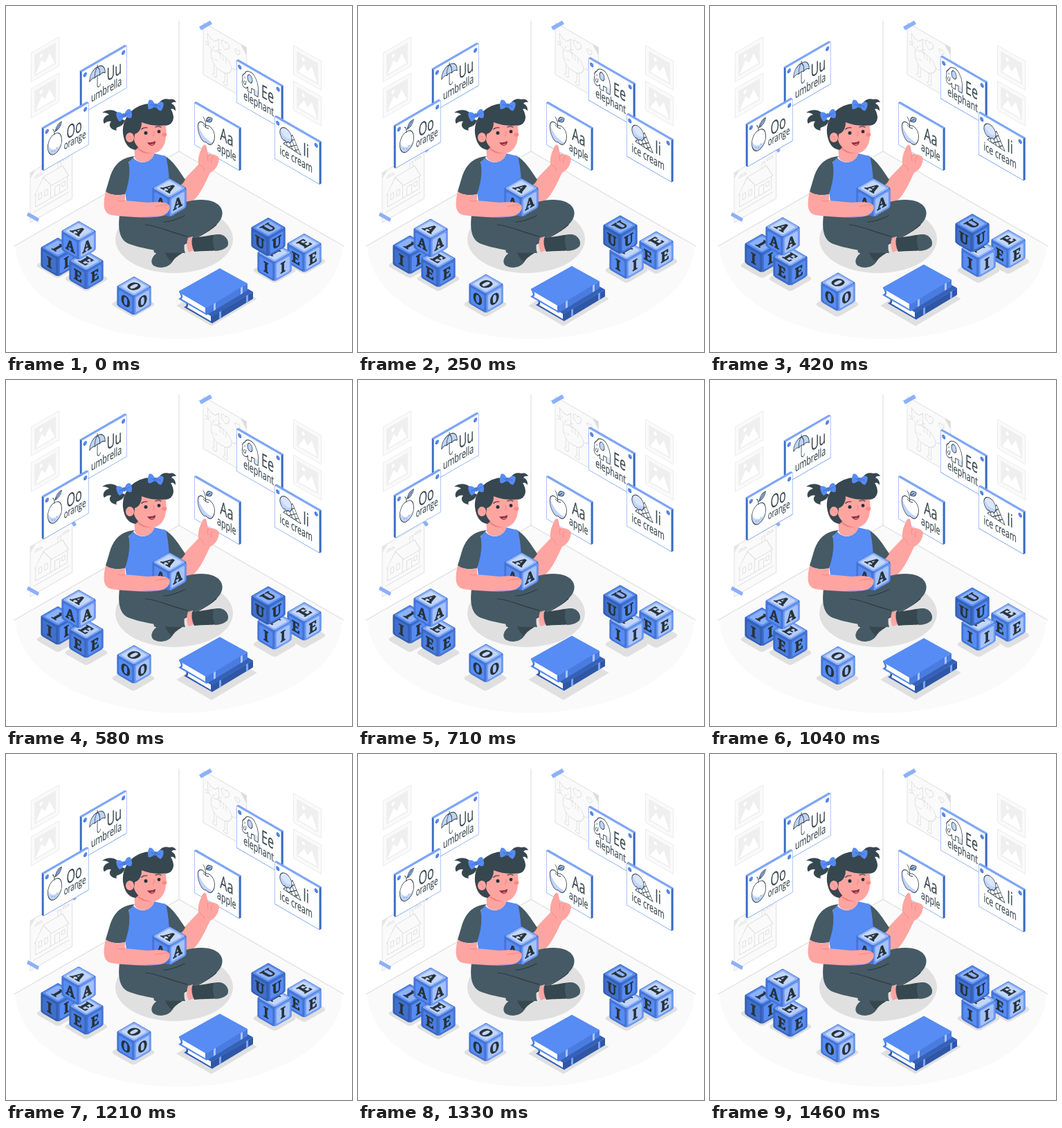
An HTML page that plays this animation: 500 px wide and 500 px high, repeating every 1500 ms.

```html
<!DOCTYPE html>
<html lang="en">
<head>
<meta charset="utf-8">
<title>Learning vowels</title>
<style>
html, body { margin: 0; height: 100%; overflow: hidden; background: #fff; }
svg { display: block; width: 100vw; height: 100vh; }
text { text-anchor: middle; }
.word { font-family: "Open Sans", sans-serif; fill: #37474f; stroke: #37474f; stroke-width: .2; }
.letter { font: 700 20px "Noto Serif", serif; fill: #263238; stroke: #263238; stroke-width: .9; }
.ink { fill: none; stroke: #37474f; stroke-width: 1; stroke-linecap: round; stroke-linejoin: round; }
.sketch { fill: none; stroke: #dedede; stroke-width: 1; stroke-linejoin: round; }
</style>
</head>
<body>
<svg id="stage" viewBox="0 0 500 500"></svg>
<script>
const BLUE = '#568cf4', PALE = '#c0d4fb', DARK = '#37474f', SLATE = '#455a64',
  SKIN = '#ffa5a1', BLUSH = '#f4827f', SHADOW = '#e0e0e0';

const path = (d, fill, extra = '') => `<path d="${d}" fill="${fill}" ${extra}/>`;
const line = (d, color, width = 1) =>
  path(d, 'none', `stroke="${color}" stroke-width="${width}" stroke-linecap="round" stroke-linejoin="round"`);
const ink = d => `<path class="ink" d="${d}"/>`;
const sketch = d => `<path class="sketch" d="${d}"/>`;
const floating = content => `<g class="float">${content}</g>`;

// Isometric planes: left wall, right wall and floor
const plane = (matrix, x, y, content) => `<g transform="matrix(${matrix},${x},${y})">${content}</g>`;
const onLeft = (...args) => plane('.866,-.5,0,1', ...args);
const onRight = (...args) => plane('.866,.5,0,1', ...args);
const onFloor = (...args) => plane('.866,.5,-.866,.5', ...args);
const rect = (x, y, w, h, fill, rx = 0) =>
  `<rect x="${x}" y="${y}" width="${w}" height="${h}" rx="${rx}" fill="${fill}"/>`;

const picture = rect(0, 0, 47.5, 43, '#ededed') + rect(1.2, 1.2, 45, 40.6, '#fafafa') +
  rect(6, 6, 35.5, 31, '#efefef') + path('M8 35L18 20L24 27L31 16L40 35Z', '#fff') +
  '<circle cx="17" cy="13" r="2.6" fill="#fff"/>';

const house = rect(0, 0, 70, 72, '#fafafa') + sketch('M0 0H70V72H0Z') +
  sketch(`M9 54V34L22 18L34 34V54ZM7 37L22 17H54L64 36H34M62 36V54H34M14 38h5v8h-5zM24 38h5v8h-5z
    M41 54V41h8v13M53 41h5v6h-5zM46 17V9h5v8M5 60H65M8 12q2-5 6-2q4-3 6 2zM54 10q2-5 6-2q4-2 5 2z`) +
  path('M0 0H9L0 9Z', '#e4e4e4');

const cat = rect(0, 0, 72, 75, '#fafafa') + sketch('M0 0H72V75H0Z') +
  sketch(`M8 23L7 12L13 17H20L26 11L26 24C26 34 8 34 8 23ZM12 22v2M21 22v2M15 26l2 1l2-1M17 27v2
    M3 25l6 1M3 30l6-2M25 26l6-2M25 28l6 2
    M14 32C10 45 18 56 30 55C44 56 52 44 44 36Q36 28 24 31
    M18 52V64q-5 4 1 5q5-1 3-5V55M36 55V67q-5 4 1 5q5-1 3-5V53
    M47 42Q58 44 55 32Q54 25 59 25M28 31l1 7M33 31l1 7M38 33l0 7M15 43q5 2 9 0
    M37 21C24 13 33 5 37 11C41 5 49 13 37 21ZM57 18C50 13 54 8 57 12C60 8 65 13 57 18Z`) +
  path('M72 0H62L72 11Z', '#dcdcdc');

function card(side, x, y, title, titleX, word, wordX, icon, { size = 17, wordY, pins = true } = {}) {
  const left = side === onLeft, w = 75, h = 61;
  const depth = left ? -3.2 : 3.2, edgeX = left ? 0 : w;
  const label = (t, cx, cy, px) =>
    `<text class="word" font-size="${px}" transform="translate(${cx} ${cy}) scale(.72 1)">${t}</text>`;
  const pin = cx => `<circle cx="${cx}" cy="7" r="3" fill="#4476d8"/><circle cx="${cx + .5}" cy="6.6" r="2.1" fill="${BLUE}"/>`;
  return side(x, y,
    path(`M${edgeX} 0l${depth} -3v${h}l${-depth} 3Z`, '#3c6ac6') +
    path(`M0 0l${depth} -3h${w}l${-depth} 3Z`, '#7ba4f7') +
    rect(0, 0, w, h, BLUE) + rect(.6, .6, w - 1.2, h - 1.2, '#fff') +
    (pins ? pin(5.5) + pin(69.5) : '') + icon +
    label(title, titleX, left ? 35 : 32, 26) + label(word, wordX, wordY || (left ? 52 : 50), size));
}

const canopy = 'M13 21C13 11 19 6 26 6S39 11 39 21Q34 17 30 20Q26 17 22 20Q18 17 13 21Z';
const umbrella = path(canopy, PALE) + ink(canopy + 'M26 6V3M22 20Q21 11 26 6Q31 11 30 20M26 19V33q0 3 3 3q2 0 2-3');
const orangeBody = 'M18 17C10 17 6 25 7 33S13 46 18 46S30 42 30 32S25 17 18 17Z';
const orange = path(orangeBody, '#fff') + path('M8 29C7 38 12 46 18 46C23 46 27 42 29 37C21 42 12 39 8 29Z', PALE) +
  path('M19 14Q21 4 30 5Q28 14 19 14Z', '#9fbdf9') +
  ink(orangeBody + 'M18 18Q18 11 15 9M19 14Q21 4 30 5Q28 14 19 14ZM19 14L27 7M14 40h.1M18 42h.1M22 39h.1');
const appleBody = 'M19 24C13 19 6 23 6 32C6 42 13 50 18 48Q20 47 22 48C28 50 34 41 34 32C34 23 26 19 19 24Z';
const apple = path(appleBody, '#fff') + path('M7 28C4 40 13 50 18 48Q20 47 22 48C25 49 28 46 30 43C20 44 10 39 7 28Z', PALE) +
  path('M20 17Q21 8 30 8Q30 16 20 17Z', '#9fbdf9') +
  ink(appleBody + 'M19 26Q20 17 15 13M20 17Q21 8 30 8Q30 16 20 17ZM20 17L27 11M15 25q5 3 9 0');
const elephantBody = `M14 12C17 4 28 3 32 10C37 16 37 27 36 35H30V28H25V35H19V29
  C17 33 12 34 10 30C8 25 12 21 10 18Q11 14 14 12Z`;
const elephant = path(elephantBody, '#fff') + path('M21 10C28 9 28 21 23 21C18 21 17 13 21 10Z', PALE) +
  path('M25 28H30V35H36V27Q30 25 25 28Z', '#dbe6fd') +
  ink(elephantBody + 'M21 10C28 9 28 21 23 21C18 21 17 13 21 10ZM14 17v1.5M13 23Q11 28 14 28Q16 27 16 22');
const cone = 'M30 12L44 34L15 32Z';
const iceCream = path(cone, '#fff') + ink(cone + 'M26 15L37 33M22 20L30 33M18 26L22 33M33 17L17 29M37 23L24 32M40 28L33 33') +
  '<circle cx="19" cy="18" r="10" fill="#dbe6fd"/>' + path('M10 14C8 24 15 29 22 28C27 26 29 22 29 18Q18 26 10 14Z', PALE) +
  ink('M29 18A10 10 0 1 0 15 27Q18 25 20 28Q23 24 25 26Q29 23 29 18Z');

const LIGHT = ['#8fb3f8', '#c3d6fb', '#4574d4', BLUE, '#6a98f5', '#a6c2fa'];
const MEDIUM = ['#7ba5f7', '#b5ccfa', '#3b69c4', '#4a7ce0', '#4574d4', BLUE];
const DEEP = [BLUE, '#8db1f8', '#345fb4', '#4070cc', '#3f6ec9', BLUE];

function cube(x, y, letter, [topEdge, top, leftEdge, left, rightEdge, right], turned = false) {
  const s = 28.4;
  const face = (edge, panel) => rect(.5, .5, s - 1, s - 1, edge, 3) + rect(3.2, 3.2, s - 6.4, s - 6.4, panel, 2.5) +
    `<text class="letter" x="${s / 2}" y="${s / 2 + 7.2}">${letter}</text>`;
  const lid = face(topEdge, top);
  return `<g transform="translate(${x} ${y})">` +
    path('M0 2L22.6 15V40L0 53L-22.6 40V15Z', leftEdge, `stroke="${leftEdge}" stroke-width="4" stroke-linejoin="round"`) +
    (turned ? plane('.866,-.5,.866,.5', -24.6, 14.2, lid) : onFloor(0, 0, lid)) +
    onRight(-24.6, 14.2, face(leftEdge, left)) + onLeft(0, 28.4, face(rightEdge, right)) + '</g>';
}

const cubeShadow = (x, y) => onFloor(x, y - 19, rect(0, 0, 38, 38, SHADOW, 5));

function book(x, y, cover, spine, band) {
  const strip = u => path(`M${40 + u} ${24.5 - u * .6}l3-1.8v10l-3 1.8z`, band);
  return `<g transform="translate(${x} ${y})">` +
    path('M0 0L40 24L99 -11V-1L40 34.5L0 11.5L3 8Z', spine) +
    path('M3 3L38 24V31.5L4 11.5Q7 7 3 3Z', '#fff') +
    path('M0 0L59 -33L99 -11L40 24.5L0 2Z', cover) +
    line('M0 11L40 34', cover, 1.3) + strip(10) + strip(49) + '</g>';
}

const bow = (x, y, turn) => `<g transform="translate(${x} ${y}) rotate(${turn})">` +
  path('M0 0C-5 -8 -10 -8 -11 -5Q-12 2 -9 7Q-4 7 0 0C4 -8 9 -9 11 -5Q12 2 9 6Q4 6 0 0Z', BLUE) +
  line('M-1 0L-7 0M1 0L7 -1', '#4172d4') + '<circle r="3" fill="#4a7ce0"/></g>';

const legs =
  path('M230 298C255 279 285 277 300 283C316 290 315 304 307 313C298 324 272 334 258 344L236 366L214 356L205 310Z', SLATE) +
  path('M224 353C212 359 207 369 213 375C223 381 236 377 240 370C244 363 251 360 256 356Z', SLATE) +
  path('M236 357L256 356C249 360 244 363 240 370Q234 366 230 356Z', DARK) +
  path('M164 302C162 320 163 336 176 343C196 351 230 356 259 357C256 348 258 340 262 332C250 328 236 321 226 312L240 300Z', SLATE) +
  line('M202 316C220 318 240 328 262 333M258 344C275 334 292 328 304 316M258 303Q240 312 228 312', '#2b3a42', 1.2) +
  path('M263 335L270 333Q267 344 272 353L264 356Q259 346 263 335Z', SKIN) +
  path('M269 335C285 334 298 330 308 330C318 331 323 340 320 347C312 356 287 353 272 355Q267 345 269 335Z', DARK) +
  path('M300 331.5Q305 330 308 330C318 331 323 340 320 347Q314 354 302 354Q297 342 300 331.5Z', SLATE);

const torso =
  path('M228 216C241 222 250 238 259 251C255 259 248 263 240 264L228 250Z', SLATE) +
  path('M184 219C191 229 209 229 214 213L231 217C235 233 236 250 236 262L240 300C214 308 190 307 173 303C178 285 169 270 172 246C174 231 178 222 184 219Z', BLUE) +
  path('M186 217C164 219 155 232 150 248L144 268C150 274 166 274 172 272C178 255 180 238 177 226Z', SLATE) +
  path('M185 196L186 219C191 229 209 228 214 215L212 205Z', SKIN) +
  path('M189 206Q198 215 212 213V208Z', BLUSH);

const head =
  path('M168 164C162 148 148 148 139 154Q146 154 149 157C141 159 139 166 142 170Q147 165 152 167C147 172 151 179 160 180C157 172 168 178 172 165Z', DARK) +
  path('M218 150C219 137 228 132 236 135Q243 133 246 139Q241 138 239 141Q246 144 245 152Q242 147 238 149Q243 155 239 162Q233 154 222 158Z', DARK) +
  path('M169 184C167 160 186 141 210 141C230 141 243 150 242 162Q241 172 230 173L187 208C176 206 171 198 169 184Z', DARK) +
  path('M187 178C190 164 200 164 229 168C232 176 232 182 231 190C230 203 222 213 211 213C198 212 188 204 185 194Z', SKIN) +
  path('M182 186Q196 184 196 168Q214 175 232 172Q238 164 230 158L190 158Z', DARK) +
  `<ellipse cx="179" cy="190" rx="6" ry="7" fill="${SKIN}"/>` + line('M176 188Q180 187 181 193', BLUSH, .9) +
  `<ellipse cx="229" cy="186" rx="3.4" ry="2.8" fill="#ff8785"/>` +
  '<circle cx="202" cy="183.5" r="2.5" fill="#263238"/><circle cx="221" cy="181.5" r="2.4" fill="#263238"/>' +
  line('M196 178Q199 175 204 176M216 175Q220 173 224 175', '#263238', 1.2) +
  line('M213 181Q216 186 212 188', BLUSH, 1) +
  path('M204 197Q211 198 216 195Q216 201 211 202Q207 202 204 197Z', '#8a3440') + path('M208 200.5Q211 198.5 214 199Q213 202 208 200.5Z', '#ff6f73') +
  bow(171, 158, -14) + bow(216, 144, 12);

const rightArm =
  path(`M258 250L278 229C277 219 280 211 284 203C286 199 290 200 290 205L292 214C299 213 309 217 308 222
    C306 233 301 238 295 241C288 255 281 272 271 281C262 287 254 282 250 274L241 263Q252 261 258 250Z`, SKIN) +
  line('M292 214Q290 219 292 224M299 217Q295 221 297 227M280 229Q285 232 287 238', BLUSH, .8);
const leftArm =
  path(`M144 268C140 286 140 299 152 302C178 306 205 305 222 304C232 302 239 295 236 288
    C228 281 216 284 204 284L172 281V272C164 274 152 274 144 268Z`, SKIN) +
  line('M236 288Q225 287 216 290M172 281Q166 283 162 281', BLUSH, .9);

const scene = [
  path('M250 210L14 346A236 135 0 0 0 486 346Z', '#fafafa'),
  line('M250 22V210L12 347M250 210L488 347', SHADOW, 1.3),
  onLeft(36, 67.5, picture), onLeft(36, 119.5, picture),
  onRight(415, 56, picture), onRight(415, 107.5, picture),
  onLeft(35, 241, house), onRight(285, 24, cat),
  path('M32 298L48 307L46 312L30 303Z', '#8db0f7'), path('M93 205L99 204L102 209L98 212Z', '#8db0f7'),
  path('M279 30L295 21L298 26L282 35Z', '#8db0f7'),
  floating(
    card(onLeft, 109.5, 95, 'Uu', 54, 'umbrella', 41, umbrella) +
    card(onLeft, 54.5, 177, 'Oo', 51, 'orange', 52, orange, { size: 15.5, wordY: 48 }) +
    card(onRight, 333, 78.5, 'Ee', 52, 'elephant', 37, elephant) +
    card(onRight, 388, 159.5, 'Ii', 52.5, 'ice cream', 36, iceCream)),
  '<ellipse cx="243" cy="337" rx="85" ry="49" fill="' + SHADOW + '"/>',
  cubeShadow(75, 375), cubeShadow(116, 394), cubeShadow(184, 431), cubeShadow(388, 382), cubeShadow(431, 369),
  path('M247 433L310 396L362 423L297 462Z', SHADOW, `stroke="${SHADOW}" stroke-linejoin="round"`),
  card(onRight, 272, 139.5, 'Aa', 54, 'apple', 54, apple, { pins: false }),
  rightArm, legs, torso, head, cube(236, 249, 'A', LIGHT), leftArm,
  floating(
    cube(75, 335, 'I', DEEP) + cube(116, 354, 'E', MEDIUM) + cube(105, 311, 'A', LIGHT) +
    cube(185, 391, 'O', LIGHT) +
    cube(431, 329, 'E', LIGHT, true) + cube(388, 342, 'I', LIGHT) + cube(379, 306, 'U', DEEP, true) +
    book(258, 424, '#3561b8', '#2f57a6', '#7ea5f2') + book(250, 412, BLUE, '#4a7ce0', '#a9c4fa')),
];
stage.innerHTML = scene.join('');

const floaters = document.querySelectorAll('.float');
const start = performance.now();
function frame() {
  const phase = (performance.now() - start) % 1500 / 1500;
  const lift = 10 * (1 - Math.abs(1 - 2 * phase));
  floaters.forEach(g => g.setAttribute('transform', `translate(0 ${-lift})`));
  requestAnimationFrame(frame);
}
frame();
</script>
</body>
</html>
```
